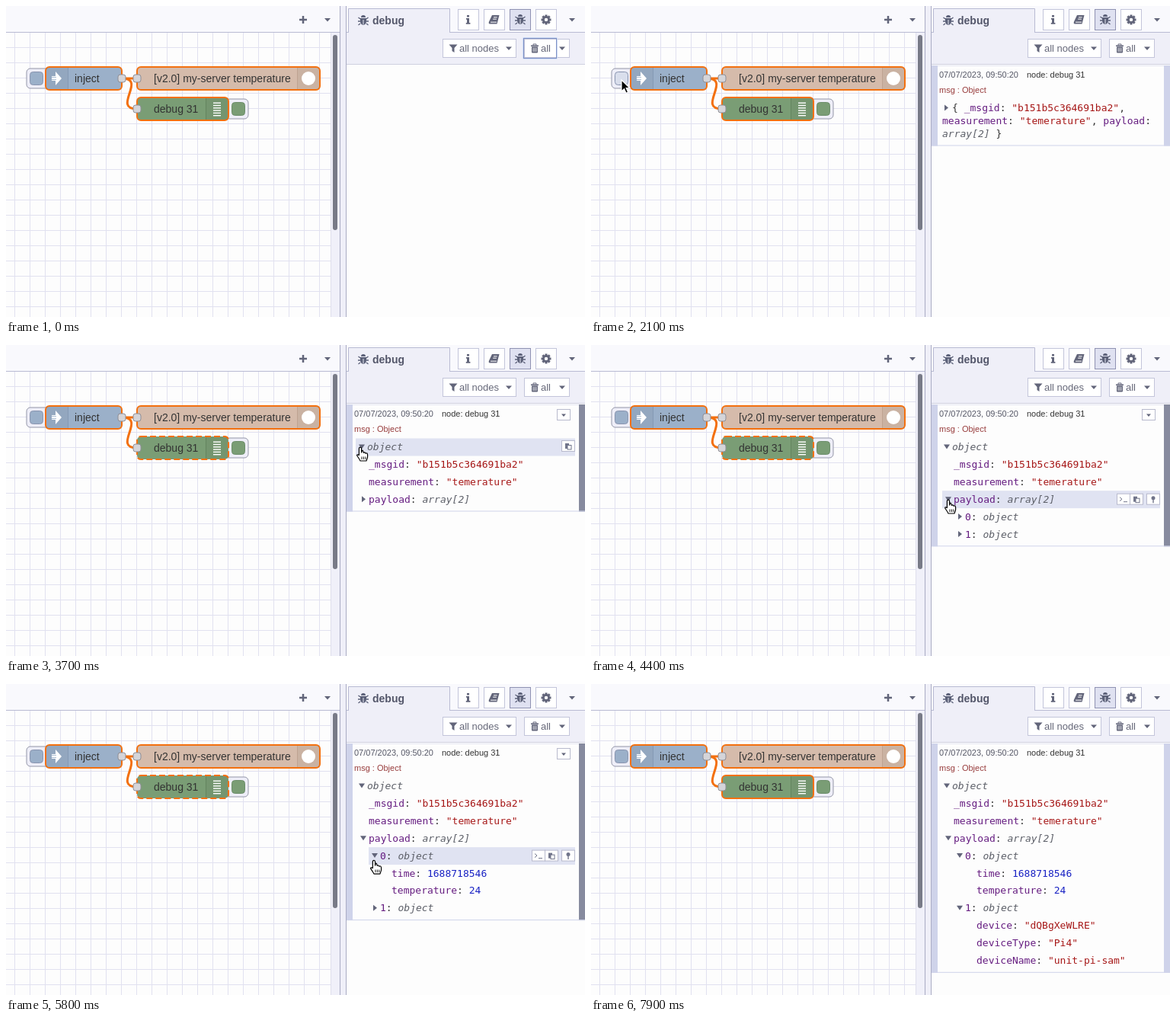
Write an HTML page that moves like this. It is 760 px wide and 408 px high and loops after 8 s.

```html
<!DOCTYPE html>
<html lang="en">
<head>
<meta charset="utf-8">
<title>Debug sidebar</title>
<style>
  html, body { margin: 0; width: 100%; height: 100%; overflow: hidden; background: #fdfdfd; }
  svg { display: block; width: 760px; height: 408px; }
  text { font: 13px "Liberation Sans", Arial, sans-serif; fill: #333; white-space: pre; }
  .label { font-size: 14px; }
  .tab { font-size: 14px; font-weight: bold; fill: #53566a; }
  .tool { fill: #666879; }
  .meta { font-size: 11px; }
  .mono { font: 13px "DejaVu Sans Mono", monospace; }
  .key { fill: #651c80; }
  .str { fill: #a61717; }
  .num { fill: #1a23c4; }
  .type { fill: #5c5f68; font-style: italic; }
  .icon { fill: #62657a; }
</style>
</head>
<body>
<svg id="stage" viewBox="0 0 760 408"></svg>
<script>
const LOOP = 8000;
const ROW_TOP = 134, ROW_STEP = 22.9;
const ORANGE = "#f3700f", EDGE = "#b9bbd3", STRIP = "#cfd3ea", HOVER = "#e0e3f2";

// Clicks: [time, view that opens]
const CLICKS = [[1950, 1], [3650, 2], [4400, 3], [5600, 4], [6250, 5]];

// Pointer: [time, x, y]
const PATH = [
  [1000, 702, 60], [1650, 40, 97], [2250, 40, 97], [2950, 468, 134],
  [3300, 468, 134], [3600, 465, 135], [3800, 465, 135], [4200, 469, 204],
  [4700, 469, 204], [5200, 475.5, 231], [5450, 483, 229], [5750, 483, 229],
  [6150, 482, 298], [6500, 482, 298], [7100, 522, 416]
];

// Rows: [depth, key, value, class, first view shown, view that unfolds it]
const ROWS = [
  [0, "", "object", "type", 2, 2],
  [1, "_msgid", '"b151b5c364691ba2"', "str", 2],
  [1, "measurement", '"temerature"', "str", 2],
  [1, "payload", "array[2]", "type", 2, 3],
  [2, "0", "object", "type", 3, 4],
  [3, "time", "1688718546", "num", 4],
  [3, "temperature", "24", "num", 4],
  [2, "1", "object", "type", 3, 5],
  [3, "device", '"dQBgXeWLRE"', "str", 5],
  [3, "deviceType", '"Pi4"', "str", 5],
  [3, "deviceName", '"unit-pi-sam"', "str", 5]
];
const INDENT = [474, 476, 491, 506];

const rect = (x, y, w, h, fill, stroke = "none", r = 0, extra = "") =>
  `<rect x="${x}" y="${y}" width="${w}" height="${h}" rx="${r}" fill="${fill}" stroke="${stroke}" ${extra}/>`;
const text = (x, y, cls, body, extra = "") => `<text x="${x}" y="${y}" class="${cls}" ${extra}>${body}</text>`;
const line = (x1, y1, x2, y2, color = EDGE, w = 1) =>
  `<path d="M${x1} ${y1}L${x2} ${y2}" stroke="${color}" stroke-width="${w}" fill="none"/>`;
const path = (d, fill, extra = "") => `<path d="${d}" fill="${fill}" ${extra}/>`;
const group = (x, y, body, extra = "") => `<g transform="translate(${x} ${y})" ${extra}>${body}</g>`;
const span = (cls, s) => `<tspan class="${cls}">${s}</tspan>`;
const caret = (x, y, s = 4) => path(`M${x - s} ${y - s / 2}h${2 * s}l${-s} ${s + .5}z`, "#62657a");
const port = (x, y) => rect(x - 5, y - 5, 10, 10, "#d5d5d9", "#8d8d95", 3);

const bug = (x, y) => group(x, y,
  path("M-3-4a3 3 0 0 1 6 0zM-4-3h8v4a4 5 0 0 1-8 0z", "#5b6078") +
  path("M-4-2l-2.5-2M4-2l2.5-2M-4 1h-3M4 1h3M-4 4l-2.5 2M4 4l2.5 2", "none", 'stroke="#5b6078" stroke-width="1.3"') +
  line(0, -1, 0, 5.5, "#e8e9f3"));

const gear = (x, y) => {
  let teeth = "";
  for (let a = 0; a < 360; a += 45) teeth += `<rect x="-1.5" y="-6.5" width="3" height="4" transform="rotate(${a})"/>`;
  return group(x, y, teeth + '<circle r="3.6" fill="none" stroke="#62657a" stroke-width="2.6"/>', 'class="icon"');
};

const book = (x, y) => group(x, y,
  path("M-3-6h9.5l-3 11.5h-9.5q-2 0-1-3z", "#62657a") +
  path("M-1-3.2h4.6M-1.8-.8h4.6M-5 3.2h8", "none", 'stroke="#fff"'));

const trash = (x, y) => group(x, y,
  path("M-5-4h10v1.4h-10zM-4-2h8v7q0 1-1 1h-6q-1 0-1-1z", "#62657a") +
  path("M-2-4v-1.5h4v1.5", "none", 'stroke="#62657a"') +
  path("M-2-.5v5M0-.5v5M2-.5v5", "none", 'stroke="#fff" stroke-width=".8"'));

const funnel = (x, y) => group(x, y, path("M-5.5-5h11l-4 4.5v6l-3-2v-4z", "#62657a"));

function gridLines() {
  let d = "";
  for (let x = 11.5; x < 426; x += 20) d += `M${x} 35V408`;
  for (let y = 54.5; y < 408; y += 20) d += `M0 ${y}H426`;
  return path(d, "none", 'stroke="#e1e1f0"');
}

function nodeBox(x, y, w, fill, iconX, extra = "") {
  return rect(x, y, w, 30, fill, ORANGE, 5, `stroke-width="2" ${extra}`) +
    rect(iconX, y + 1, 29, 28, "rgba(0,0,0,.05)");
}

function canvas() {
  const bars = [0, 1, 2, 3, 4, 5].map(i => rect(272, 126.5 + i * 3.3, 10, 1.4, "#fff")).join("");
  return rect(0, 0, 438, 408, "#fdfdfd") + gridLines() +
    rect(0, 0, 438, 34, "#f9f9fd") + line(0, 34.5, 438, 34.5) +
    line(385, 18, 395, 18, "#62657a", 2.5) + line(390, 13, 390, 23, "#62657a", 2.5) + caret(422, 18) +
    rect(426, 35, 12, 373, "#f0f0f9") + line(426.5, 35, 426.5, 408, "#dfdfec") +
    rect(429, 38, 6, 256, "#787a87", "none", 3) +
    path("M152 95H172M152 95C185.5 95 138.5 135 172 135", "none", `stroke="${ORANGE}" stroke-width="3"`) +
    rect(27, 82, 30, 26, "#eeeef8", "#9496a8", 5) +
    rect(31.5, 86.5, 17, 17, "#9bb0c9", "#8a95b0", 4, 'id="press"') +
    nodeBox(52, 80, 100, "#9bb0c9", 53) + line(81.5, 81, 81.5, 109, "#8499b3") +
    path("M60 92h5v-6l8 9-8 9v-6h-5z", "#fff") +
    path("M60 93.5h6M60 96.5h6", "none", 'stroke="#9bb0c9" stroke-width=".8"') +
    text(90, 100, "label", "inject") +
    nodeBox(172, 80, 240, "#d5bbab", 382) + line(382.5, 81, 382.5, 109, "#bea392") +
    '<circle cx="397" cy="95" r="9" fill="#fff"/>' +
    text(194, 100, "label", "[v2.0] my-server temperature") +
    rect(288, 122, 30, 26, "#eeeef8", "#9496a8", 5) +
    rect(296.5, 126.5, 17, 17, "#7a9d75", "#6b8d69", 4) +
    nodeBox(172, 120, 120, "#7a9d75", 262, 'id="node"') + line(262.5, 121, 262.5, 149, "#64855f") + bars +
    text(194, 140, "label", "debug 31", 'font-style="italic"') +
    port(152, 95) + port(172, 95) + port(172, 135);
}

function sidebar() {
  const buttons = [593, 627, 661, 695].map(x =>
    rect(x + .5, 4.5, 27, 27, x === 661 ? "#dfe1f1" : "#fff", x === 661 ? "#8f92b2" : "#c3c5da")).join("");
  return rect(438, 0, 9, 408, "#efeff8") + line(438.5, 0, 438.5, 408, "#aaacc4") + line(446.5, 0, 446.5, 408, "#aaacc4") +
    rect(447, 0, 313, 35, "#f9f9fd") + rect(447, 35, 313, 41, "#efeff8") +
    line(447, 34.5, 760, 34.5) + line(447, 76.5, 760, 76.5, "#cfd0e0") +
    path("M449.5 35V3.5H582.5V35", "#efeff8", `stroke="${EDGE}"`) +
    bug(469, 19) + text(481, 24, "tab", "debug") + buttons +
    path("M605 12h3v2.6h-3zM604 16h4v6h1.4v1.8h-5.6v-1.8h1.2v-4.2h-1z", "#62657a") +
    book(641, 18) + bug(675, 18) + gear(709, 18) + caret(743, 18) +
    rect(573.5, 43.5, 96, 24, "#fff", "#c3c5da") + funnel(587, 55.5) +
    text(595, 60, "tool", "all nodes") + caret(660, 55.5) +
    rect(680.5, 43.5, 59, 24, "#fff", "#c3c5da") + trash(694, 55.5) +
    text(702, 60, "tool", "all") + caret(730, 55.5) +
    `<g id="focus">${rect(679, 42, 44, 27, "none", "#cfdcf5", 1, 'stroke-width="2"')}${rect(679.5, 42.5, 43, 26, "none", "#7d90c4")}</g>`;
}

const smallButton = (x, y, icon) => rect(x + .5, y + .5, 17, 14, "#fff", "#b8bacd") + group(x + 9, y + 8, icon);
const COPY = path("M-4-4h5v7h-5z", "#70748a") + rect(-1, -1.5, 5, 5.5, "#fff", "#70748a");
const PROMPT = path("M-5-3l3 2.5-3 2.5M0 3h5", "none", 'stroke="#70748a"');
const PIN = '<circle cy="-2" r="2.5" fill="#70748a"/>' + line(0, 0, 0, 4.5, "#70748a", 1.4);

function arrow(x, y, open) {
  return path(open ? `M${x - 4} ${y - 3}h8l-4 6z` : `M${x - 2} ${y - 4}v8l5-4z`, "#62657a");
}

function collapsed(p) {
  const over = p && p.x > 459 && p.x < 748 && p.y > 122 && p.y < 179;
  const q = s => span("str", s), k = s => span("key", s);
  return (over ? rect(459, 122, 289, 57, HOVER) : "") + arrow(466, 133.5, false) +
    text(474, 138, "mono", `{ ${k("_msgid")}: ${q('"b151b5c364691ba2"')},`) +
    text(461, 155, "mono", `${k("measurement")}: ${q('"temerature"')}, ${k("payload")}:`) +
    text(461, 172, "mono", `${span("type", "array[2]")} }`) +
    (over ? smallButton(729, 125, COPY) : "");
}

function tree(rows, view, p) {
  return rows.map(([depth, key, value, cls, , unfold], i) => {
    const x = INDENT[depth], y = ROW_TOP + i * ROW_STEP, left = x - 15;
    const over = p && p.x > left && p.x < 748 && Math.abs(p.y - y) < ROW_STEP / 2;
    let out = over ? rect(left, y - 11.5, 747 - left, 23, HOVER) : "";
    if (unfold) out += arrow(x - 7, y - .5, view >= unfold);
    out += text(x, y + 4, "mono", (key ? span("key", key) + ": " : "") + span(cls, value));
    if (over) out += depth
      ? smallButton(690, y - 8, PROMPT) + smallButton(707, y - 8, COPY) + smallButton(729, y - 8, PIN)
      : smallButton(729, y - 9, COPY);
    return out;
  }).join("");
}

function message(view, p, hovered, rows, bottom) {
  const h = bottom - 78;
  return rect(447, 78, 313, h, "#fdfdfd") + line(447, 78.5, 760, 78.5, "#e4e6f3") +
    rect(447, 78, 8, h, STRIP) + rect(752, 78, 8, h, hovered ? "#878b9f" : STRIP) +
    line(447, bottom - .5, 760, bottom - .5, STRIP) +
    text(457, 94, "meta", "07/07/2023, 09:50:20", 'style="fill:#555766"') +
    text(572, 94, "meta", "node: debug 31") +
    text(457, 114, "meta", "msg : Object", 'style="fill:#983d3d"') +
    (hovered ? rect(723.5, 84.5, 17, 14, "#fff", "#b8bacd") + caret(732, 92, 3) : "") +
    (view === 1 ? collapsed(p) : tree(rows, view, p));
}

const POINTER = path("M0 0V15L3.6 11.7 6 17.2 8.6 16 6.2 10.7H11z", "#000", 'stroke="#fff" stroke-width="1.2"');
const HAND = path("M-1.6 9.5V1.2Q-1.6-.8 0-.8T1.6 1.2V6Q3-.0 4.3 6.3 5.8 5 7 7.2 9.4 6 9.6 9V12Q9 14 8 17H0Q-1-14 -1 14L-4.3 10Q-4.5 8-1.6 9.5z".replace("Q-1-14 -1 14", "Q-1 15-2 13.5"),
  "#fff", 'stroke="#000" stroke-width="1.2" stroke-linejoin="round"') +
  path("M2 11.5v3.5M4.4 11.5v3.5M6.8 11.5v3.5", "none", 'stroke="#000" stroke-width=".9"');

function pointerAt(t) {
  const i = PATH.findIndex(k => k[0] > t);
  if (i < 1) return null;
  const [t0, x0, y0] = PATH[i - 1], [t1, x1, y1] = PATH[i];
  const u = (t - t0) / (t1 - t0), e = u * u * (3 - 2 * u);
  return { x: x0 + (x1 - x0) * e, y: y0 + (y1 - y0) * e };
}

const stage = document.getElementById("stage");
stage.innerHTML = canvas() + sidebar() + '<g id="message"></g><g id="pointer"></g>';
const part = id => document.getElementById(id);
const press = part("press"), node = part("node"), focusRing = part("focus");
const messageBox = part("message"), pointer = part("pointer");
let drawn = "";

function draw(t) {
  const p = pointerAt(t);
  const view = CLICKS.reduce((v, [at, next]) => t >= at ? next : v, 0);
  const rows = ROWS.filter(r => view >= r[4]);
  const bottom = view < 2 ? 183.5 : ROW_TOP + (rows.length - 1) * ROW_STEP + 15.8;
  const hovered = Boolean(view && p && p.x > 447 && p.y > 78 && p.y < bottom);

  const body = view ? message(view, p, hovered, rows, bottom) : "";
  if (body !== drawn) messageBox.innerHTML = drawn = body;

  const onButton = p && p.x > 31 && p.x < 49 && p.y > 86 && p.y < 104;
  press.setAttribute("fill-opacity", onButton ? .25 : 1);
  node.setAttribute("stroke-dasharray", hovered ? "8 4" : "none");
  focusRing.setAttribute("visibility", view ? "hidden" : "visible");

  const hand = hovered && t < 6550 && p.x < 492 && p.y > 122;
  pointer.innerHTML = p ? group(p.x, p.y, hand ? HAND : POINTER) : "";
}

const start = performance.now();
function tick() {
  draw((performance.now() - start) % LOOP);
  requestAnimationFrame(tick);
}
tick();
</script>
</body>
</html>
```
